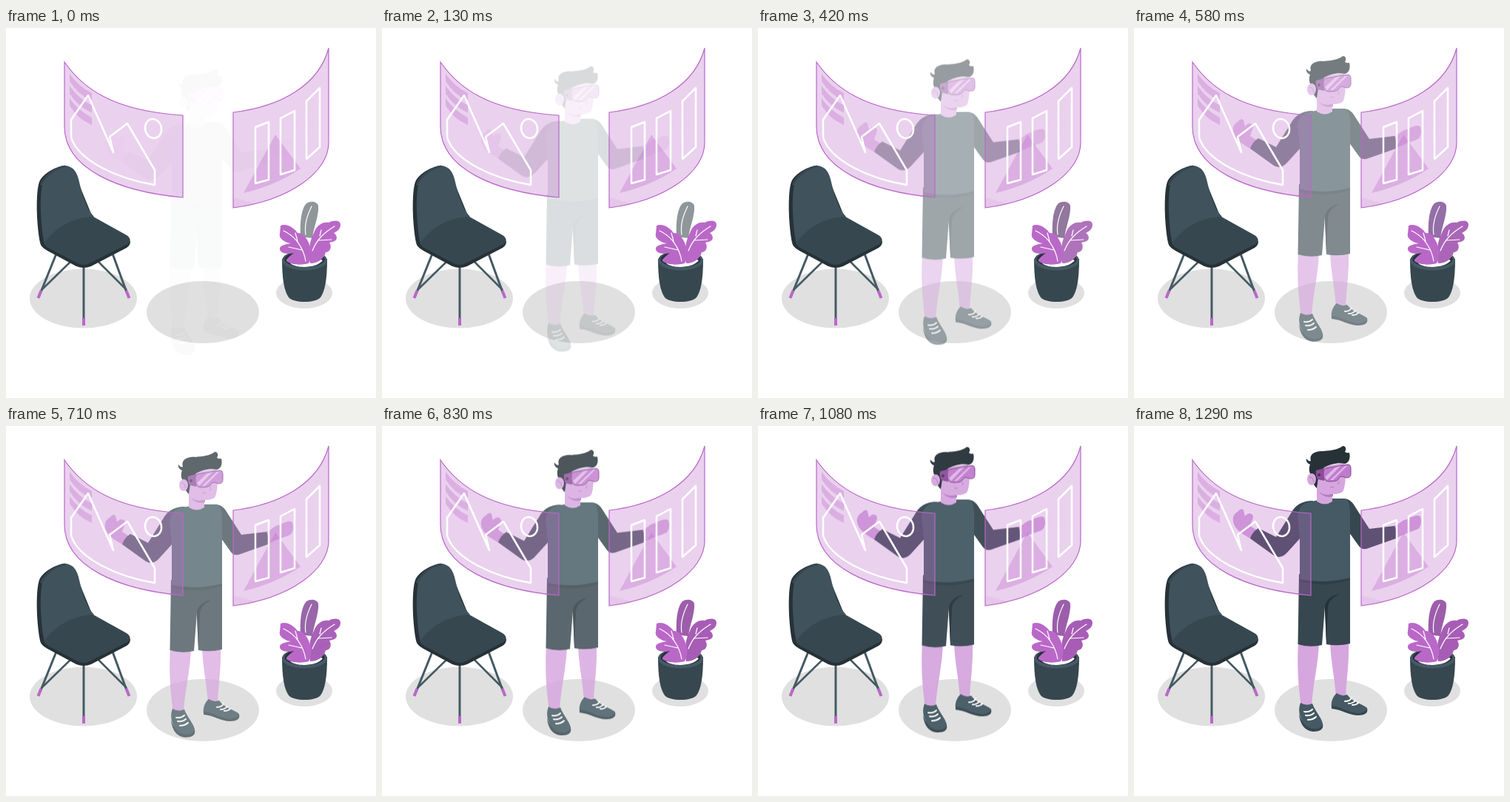
Recreate the animation shown at these times as an HTML page. Size 500 by 500 pixels, loop 1330 ms.

```html
<!DOCTYPE html>
<html lang="en">
<head>
<meta charset="utf-8">
<title>Virtual screens</title>
<style>
  html, body { margin: 0; width: 100%; height: 100%; overflow: hidden; background: #fff; }
  svg { display: block; width: 100%; height: 100%; }
  .white { fill: none; stroke: #fff; stroke-linecap: round; stroke-linejoin: round; }
  .night { fill: #263238; }
  .dark { fill: #37474f; }
  .slate { fill: #455a64; }
  .skin { fill: #d6a6df; }
  .purple { fill: #ba68c8; }
  .glass { fill: #ba68c8; fill-opacity: .3; stroke: #ba68c8; stroke-width: 1.2; }
  .tint { fill: #ba68c8; fill-opacity: .32; }
  .faint { fill: #ba68c8; fill-opacity: .1; }
</style>
</head>
<body>
<svg viewBox="0 0 500 500">
  <g fill="#e0e0e0">
    <ellipse cx="104.5" cy="365.5" rx="72.5" ry="40"/>
    <ellipse cx="266" cy="384" rx="76" ry="42"/>
    <ellipse cx="403" cy="358" rx="38" ry="21"/>
  </g>

  <g id="chair">
    <g fill="none" stroke="#455a64" stroke-width="3">
      <path d="M87 316L48 354M125 316L163 354" stroke-width="2.5"/>
      <path d="M68 305L47 357M144 305L163 357M105 321V393"/>
    </g>
    <path d="M47.500 355L43.500 365M162.500 355L166.500 365M105 392V402" stroke="#ba68c8" stroke-width="4"/>
    <path class="night" d="M80 186C70 186 50 196 45 208C40 222 41 265 46 290C47 295 51 298 56 301L95 322Q105 326 115 322L163 297Q168 294 168 288L118 258L90 190Z"/>
    <path fill="#40525b" d="M80 186C90 187 95 193 98 204C103 226 109 245 119 255L95 275L52 292C47 270 45 230 49 211C53 199 68 187 80 186Z"/>
    <path class="dark" d="M51 291C66 271 88 256 118 255L163 280C169 284 169 289 164 292L113 318Q105 322 97 318L55 296Z"/>
    <path d="M47 212C53 199 67 189 80 187" fill="none" stroke="#37474f" stroke-width="3"/>
  </g>

  <g id="plant">
    <path class="dark" d="M373 312C373 339 376 356 382 364C389 372 418 372 425 364C431 356 434 339 434 312Z"/>
    <ellipse class="slate" cx="403.500" cy="314" rx="30.500" ry="13.500"/>
    <ellipse class="night" cx="403.500" cy="312.500" rx="27" ry="10.500"/>
    <path fill="#fff" d="M384 318C392 312 420 309 428 314C421 324 394 326 384 318Z"/>
    <path id="back" d="M398 282C397 262 399 246 405 238C410 233 420 234 422 240C423 254 416 268 414 284Z"/>
    <path id="side" d="M411 318C408 304 410 288 416 277C419 268 427 261 436 263C444 259 452 260 452 266C452 272 447 275 443 277C449 281 448 288 441 289L437 290C441 296 438 303 432 303C430 311 423 318 411 318Z"/>
    <path class="purple" d="M371 267C379 264 388 269 394 277C403 276 410 289 412 300C413 308 411 314 409 318C398 321 385 320 379 315C378 312 384 308 389 304C381 306 371 305 370 299C369 294 378 292 385 291C377 290 368 284 370 278Z"/>
    <g class="white" stroke-width="1.200">
      <path d="M375 274C391 281 402 297 405 315M382 296L400 300M391 277L394 288"/>
      <path d="M414 301C420 286 429 277 444 268M422 287L440 286M426 273L424 281"/>
      <path d="M413 241C406 255 403 267 405 279"/>
    </g>
  </g>

  <g id="man">
    <path class="skin" d="M222 291H250C249 325 242 346 240 380H226C222 350 220 325 222 291ZM265 291H290C291 320 287 342 286 366H273C271 338 266 320 265 291Z"/>
    <g id="shoes">
      <path class="slate" d="M225 374C222 382 223 389 226 396C229 405 234 411 243 412C251 412 256 409 255 402C253 393 245 386 241 375Q233 379 225 374Z"/>
      <path class="dark" d="M223 389C227 402 234 409 244 409C250 409 254 407 255 403C257 410 250 413 242 413C231 412 224 403 223 389Z"/>
      <path class="slate" d="M274 361C268 366 266 374 267 380C279 381 291 389 303 389C312 389 316 386 315 381C308 375 296 374 288 363Q281 366 274 361Z"/>
      <path class="dark" d="M267 378C279 379 290 387 302 388C308 388 313 386 315 382C317 388 311 391 303 391C291 391 280 383 267 382Z"/>
      <path class="white" stroke-width="2" d="M230 386Q237 387 241 383M232 391Q239 392 243 388M235 397Q242 397 246 393M285 372Q292 372 294 367M290 375Q296 375 299 371M295 377Q301 377 303 374"/>
    </g>
    <path class="dark" d="M223 200H292L292 294Q276 298 260 295L258 244L254 296Q238 300 221.500 295Z"/>
    <path class="night" d="M258 250C257 236 264 231 278 226C269 232 263 236 262 245L260 294Z"/>
    <path class="night" opacity=".4" d="M223 204Q258 216 292 203V208Q258 219 223 210Z"/>

    <path class="skin" d="M166 141L157 152C147 146 136 140 134 129C133 122 136 118 140 116C143 112 147 111 148 114C149 117 149 119 150 122C153 118 157 117 160 120C163 123 158 130 157 135Z"/>
    <path class="skin" d="M352 135C358 133 362 127 369 126C376 122 386 119 387 123C389 128 388 136 384 139C375 143 366 145 354 152Z"/>
    <path class="dark" d="M242 101C226 101 217 108 212 118L192 150L168 138Q160 143 157 152L189 175Q198 180 206 172L226 150ZM282 98C292 98 296 104 300 111L318 139L352 135Q356 143 354 152L317 165Q308 169 303 161L288 140Z"/>
    <path class="slate" d="M240 102L249 100Q258 106 267 98L283 98C290 99 292 106 292 118V205Q258 214 224 207V150L221 122C222 109 230 103 240 102Z"/>
    <path class="skin" d="M247 78H268V102Q258 109 247 102Z"/>
    <path fill="#b67cc2" d="M249 88Q258 96 269 91V95Q258 99 249 88Z"/>
    <path class="skin" d="M246 56L284 50C287 66 286 79 283 87C281 92 269 93 262 91Q250 88 247 76Z"/>
    <path class="night" d="M247 84C242 80 240 72 238 64C236 60 237 54 238 52C235 51 232 48 233 44C235 47 237 48 239 47C236 38 245 33 256 34C266 33 276 32 282 27C287 27 287 32 285 35Q288 37 291 36C293 44 290 50 285 51C276 49 264 52 257 56C252 60 252 68 249 70Z"/>
    <ellipse class="skin" cx="240" cy="72" rx="6" ry="8"/>
    <path d="M237 69Q242 69 243 76M265 82Q268 84 270 82M275 74Q279 77 275 79" fill="none" stroke="#b27abd" stroke-width="1"/>
    <path fill="#8e4d9b" d="M246 60L257 57V74L248 72Q245 66 246 60Z"/>
    <circle cx="250" cy="66" r="2" fill="#493653"/>
    <path fill="#c07bce" stroke="#7c4d88" stroke-width="1" d="M259 57L289 52Q293 52 293 57V65Q293 70 287 70L281 68Q278 68 276 72Q274 75 264 75Q257 75 256 68V62Q256 58 259 57Z"/>
    <path fill="#dfb6e6" d="M258 69L272 56L279 54L261 73ZM265 73L285 54L288 54L269 73Z"/>
  </g>

  <g id="left">
    <path class="glass" d="M79 46C104 82 145 112 239 118V229C151 221 79 190 79 133Z"/>
    <g id="bands" class="tint"></g>
    <path class="white" stroke-width="2.500" d="M88 124L111 91L145 168L140 147L164 129L201 192V212C152 204 98 180 88 148Z"/>
    <ellipse class="white" stroke-width="2.500" cx="199" cy="136" rx="11" ry="13" transform="rotate(-12 199 136)"/>
  </g>

  <g id="right">
    <path class="glass" d="M307 114C372 106 423 77 436 27V155C436 195 383 233 307 243Z"/>
    <path class="faint" d="M307 229L337 237Q322 241 307 243Z"/>
    <path class="tint" d="M364 144L398 190Q364 213 321 223Z"/>
    <path class="white" stroke-width="2.500" d="M337 134L355 127V205L337 210ZM371 122L390 112V192L371 198ZM406 99L424 81V161L406 177Z"/>
  </g>
</svg>
<script>
  const LOOP = 1330, STEPS = 32, RISE = 30;
  const $ = id => document.getElementById(id);
  const man = $("man"), back = $("back"), side = $("side");

  $("bands").innerHTML = [0, 16.5, 33].map(y =>
    `<path transform="translate(0 ${y})" d="M86 62Q98 79 116 88V98Q97 90 86 72Z"/>`).join("");

  // leaf tones: [step, back leaf, side leaf]
  const tones = [
    [6, [143, 151, 155], [186, 104, 200]],
    [10, [146, 119, 158], [174, 115, 187]],
    [14, [148, 110, 166], [171, 101, 184]],
    [20, [156, 93, 171], [167, 93, 181]]
  ];

  const mix = (a, b, u) => `rgb(${a.map((v, i) => Math.round(v + (b[i] - v) * u))})`;

  // cubic-bezier(0, 0, .58, 1)
  function easeOut(p) {
    let lo = 0, hi = 1;
    for (let i = 0; i < 24; i++) {
      const s = (lo + hi) / 2;
      if (1.74 * (1 - s) * s * s + s * s * s < p) lo = s; else hi = s;
    }
    return 3 * (1 - lo) * lo * lo + lo * lo * lo;
  }

  function draw(ms) {
    const step = Math.min(STEPS - 1, Math.floor((ms % LOOP + 2) * STEPS / LOOP));
    const e = easeOut((step + 0.6) / STEPS);
    man.setAttribute("opacity", e.toFixed(3));
    man.setAttribute("transform", `translate(0 ${(RISE * (1 - e)).toFixed(2)})`);

    let i = 0;
    while (i < tones.length - 2 && step > tones[i + 1][0]) i++;
    const [a, b] = [tones[i], tones[i + 1]];
    const u = Math.max(0, Math.min(1, (step - a[0]) / (b[0] - a[0])));
    back.setAttribute("fill", mix(a[1], b[1], u));
    side.setAttribute("fill", mix(a[2], b[2], u));
  }

  const start = performance.now();
  function tick() {
    draw(performance.now() - start);
    requestAnimationFrame(tick);
  }
  tick();
</script>
</body>
</html>
```
